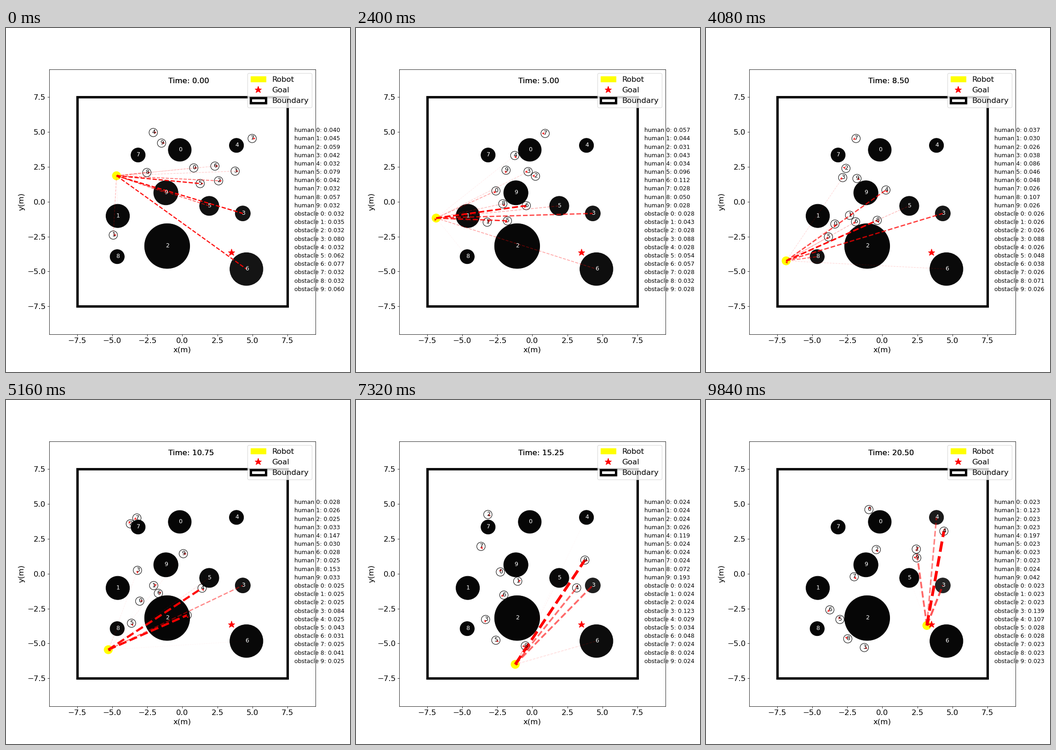
Animation of 748 by 748 pixels, one loop 9960 ms. Source, as a matplotlib script:

```python
import numpy as np
import matplotlib.pyplot as plt
from matplotlib.animation import FuncAnimation
from matplotlib.lines import Line2D
from matplotlib.patches import ArrowStyle, Circle, FancyArrowPatch, Rectangle

plt.rcParams["font.family"] = "DejaVu Sans"

FRAMES, INTERVAL, STEP = 83, 120, 0.25
RADIUS = 0.3
TIMES = np.arange(FRAMES)

# Waypoints in stage pixels; every human shares the same key times.
HUMAN_KEYS = [0, 20, 34, 53, 70, 82]
HUMANS = [
    [(408, 304), (304, 354), (280, 426), (310, 418), (321, 311), (354, 238)],
    [(233, 450), (285, 422), (312, 407), (333, 399), (384, 378), (457, 324)],
    [(462, 332), (390, 322), (304, 305), (260, 237), (329, 279), (370, 325)],
    [(498, 311), (374, 312), (297, 325), (289, 433), (286, 517), (344, 538)],
    [(320, 227), (345, 277), (391, 352), (462, 444), (495, 346), (517, 285)],
    [(422, 338), (329, 419), (266, 454), (296, 514), (306, 516), (291, 477)],
    [(454, 300), (370, 386), (325, 421), (341, 415), (293, 438), (269, 456)],
    [(535, 240), (411, 229), (326, 240), (260, 284), (297, 356), (322, 384)],
    [(306, 314), (319, 382), (372, 418), (397, 520), (329, 535), (308, 519)],
    [(338, 250), (326, 309), (328, 327), (460, 340), (512, 353), (458, 343)],
]
ROBOT_KEYS = [0, 8, 20, 34, 53, 63, 70, 82]
ROBOT = [(240, 321), (226, 361), (174, 413), (174, 506),
         (295, 565), (359, 571), (406, 533), (480, 490)]

OBSTACLES = [  # x, y, radius in metres
    (-0.18, 3.72, 0.82), (-4.6, -1.02, 0.84), (-1.08, -3.18, 1.61), (4.31, -0.84, 0.54),
    (3.86, 4.04, 0.51), (1.92, -0.3, 0.69), (4.57, -4.83, 1.18), (-3.15, 3.35, 0.51),
    (-4.64, -3.94, 0.51), (-1.17, 0.64, 0.87)]

# Surges of attention: peak frame, height and width.
SURGES = {
    "human 0": [(18, 0.03, 16)],
    "human 1": [(85, 0.11, 10), (12, 0.02, 18)],
    "human 2": [(0, 0.027, 14)],
    "human 3": [(20, 0.015, 30)],
    "human 4": [(50, 0.145, 17), (84, 0.19, 6)],
    "human 5": [(13, 0.08, 18)],
    "human 6": [(19, 0.085, 13)],
    "human 8": [(45, 0.13, 16), (6, 0.03, 14)],
    "human 9": [(64, 0.18, 12)],
    "obstacle 1": [(14, 0.022, 10)],
    "obstacle 3": [(30, 0.062, 60), (73, 0.17, 11)],
    "obstacle 4": [(86, 0.09, 15)],
    "obstacle 5": [(0, 0.03, 60)],
    "obstacle 6": [(0, 0.045, 30), (69, 0.065, 8)],
    "obstacle 8": [(34, 0.045, 9)],
    "obstacle 9": [(0, 0.028, 7)],
}


def to_metres(points):
    return (np.asarray(points, float) - (383.1, 377.5)) / (30.511, -30.314)


def smooth_path(keys, points):
    """Cubic Hermite path sampled at every frame, starting from rest."""
    keys, points = np.array(keys, float), to_metres(points)
    slope = np.gradient(points, keys, axis=0)
    slope[0] = 0
    k = np.clip(np.searchsorted(keys, TIMES, "right") - 1, 0, len(keys) - 2)
    h = (keys[k + 1] - keys[k])[:, None]
    s = (TIMES - keys[k])[:, None] / h
    return ((1 + 2 * s) * (1 - s) ** 2 * points[k] + s * (1 - s) ** 2 * h * slope[k]
            + s * s * (3 - 2 * s) * points[k + 1] + s * s * (s - 1) * h * slope[k + 1])


def headings(path):
    step = np.diff(path, axis=0, prepend=path[:1])
    return np.arctan2(step[:, 1], step[:, 0])


def attention(name):
    """A slowly fading base level plus Gaussian surges."""
    level = 0.022 + 0.01 * np.exp(-TIMES / 35)
    for peak, height, width in SURGES.get(name, []):
        level = level + height * np.exp(-((TIMES - peak) / width) ** 2)
    return level


paths = [smooth_path(HUMAN_KEYS, row) for row in HUMANS] + [smooth_path(ROBOT_KEYS, ROBOT)]
angles = [headings(path) for path in paths]
obstacle_xy = [np.array(o[:2]) for o in OBSTACLES]
labels = [f"{kind} {i}" for kind in ("human", "obstacle") for i in range(10)]
weights = np.array([attention(label) for label in labels]).T

fig, ax = plt.subplots(figsize=(10, 10), dpi=74.8)
ax.set(xlim=(-9.5, 9.5), ylim=(-9.5, 9.5))
ticks = np.arange(-7.5, 8, 2.5)
ax.set_xticks(ticks)
ax.set_yticks(ticks)
ax.tick_params(labelsize=16)
ax.set_xlabel("x(m)", fontsize=16)
ax.set_ylabel("y(m)", fontsize=16)

boundary = ax.add_patch(Rectangle((-7.5, -7.5), 15, 15, fill=False, lw=5, ec="black"))
goal = ax.add_line(Line2D([3.48], [-3.63], color="red", marker="*", ls="None", ms=15))

discs = []
for i, (x, y, r) in enumerate(OBSTACLES):
    discs.append(ax.add_patch(Circle((x, y), r, color="black")))
    ax.text(x - 0.1, y - 0.1, str(i), color="white", fontsize=12)

rings = [ax.add_patch(Circle((0, 0), RADIUS, fill=False, ec="black")) for _ in HUMANS]
digits = [ax.text(0, 0, str(i), color="black", fontsize=12) for i in range(len(HUMANS))]
robot = ax.add_patch(Circle((0, 0), RADIUS, color="yellow"))
head = ArrowStyle("->", head_length=4, head_width=2)
arrows = [ax.add_patch(FancyArrowPatch((0, 0), (1, 0), color="red", arrowstyle=head))
          for _ in paths]

links = [ax.add_line(Line2D([], [], color="red", ls="--")) for _ in labels]
readouts = [ax.text(8, 5 - 0.6 * i, "", fontsize=12) for i in range(len(labels))]
# Two overlaid copies give the clock its heavier strokes.
clocks = [ax.text(-1, 8.5, "", fontsize=16) for _ in range(2)]
ax.legend([robot, goal, boundary], ["Robot", "Goal", "Boundary"],
          fontsize=16, loc="upper right")


def update(i):
    for clock in clocks:
        clock.set_text(f"Time: {i * STEP:.2f}")

    agents = [path[i] for path in paths]
    for circle, arrow, pos, angle in zip(rings + [robot], arrows, agents, angles):
        circle.center = pos
        tip = pos + RADIUS * np.array([np.cos(angle[i]), np.sin(angle[i])])
        arrow.set_positions(pos, tip)
    for digit, pos in zip(digits, agents):
        digit.set_position(pos - 0.1)

    w = weights[i]
    opacity = (w - w.min()) / (w.max() - w.min())
    *people, home = agents
    for k, target in enumerate(people + obstacle_xy):
        links[k].set_data(*zip(home, target))
        links[k].set_linewidth(30 * w[k])
        links[k].set_alpha(opacity[k])
        readouts[k].set_text(f"{labels[k]}: {w[k]:.3f}")
    for disc, shade in zip(discs, w[10:]):
        disc.set_color(str(shade))


anim = FuncAnimation(fig, update, frames=FRAMES, interval=INTERVAL,
                     init_func=lambda: update(0), repeat=True, repeat_delay=0, blit=False)
plt.show()
```
